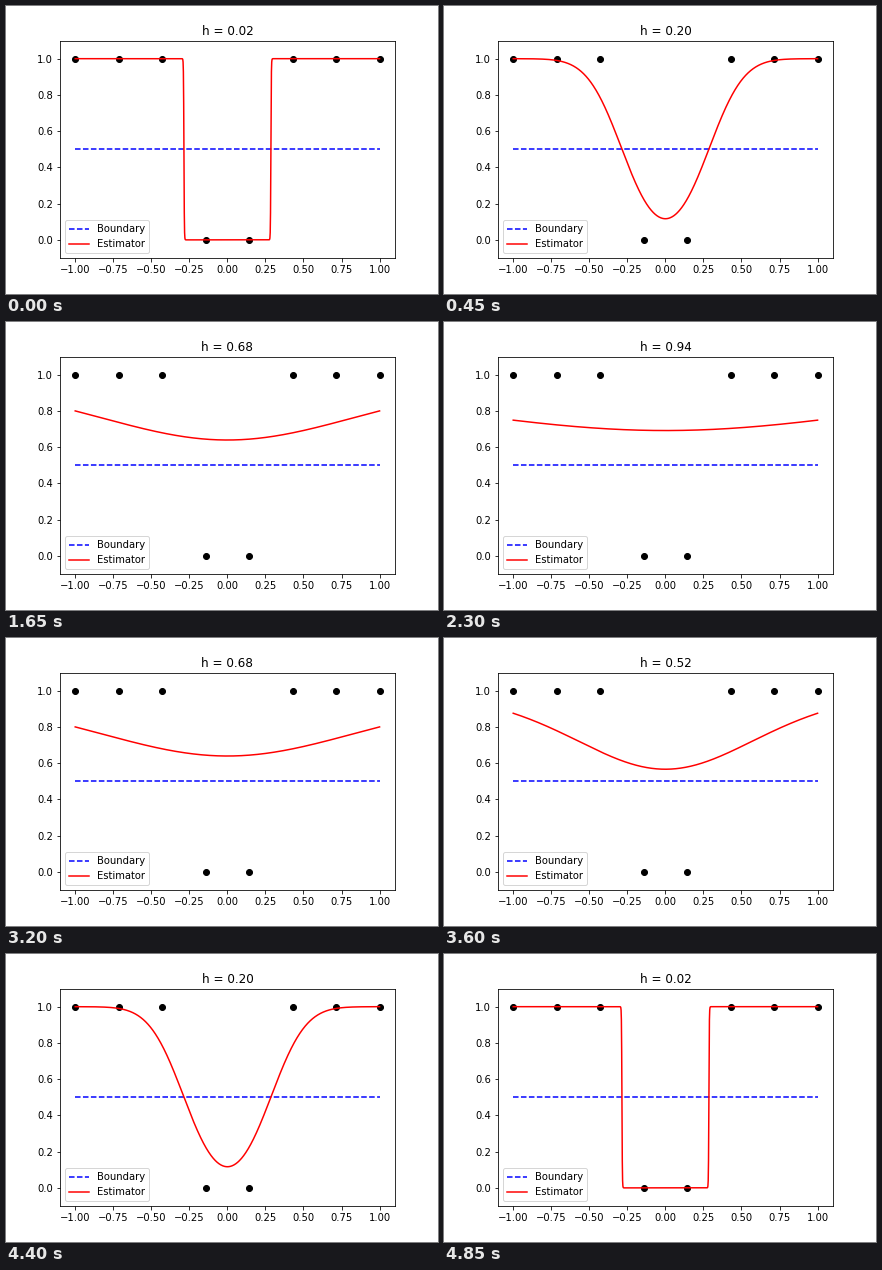
Recreate the animation shown at these times as a matplotlib script. Size 432x288 px, loop 4900 ms.

```python
import numpy as np
import matplotlib.pyplot as plt
from matplotlib.animation import FuncAnimation

plt.rcParams["font.family"] = "DejaVu Sans"
plt.rcParams["font.size"] = 10

STEP = 0.02
RISE = 49
FRAMES = 2 * RISE
INTERVAL = 50

samples = np.linspace(-1, 1, 8)
labels = (np.abs(samples) > 0.25).astype(float)
grid = np.linspace(-1, 1, 1000)


def bandwidth(frame):
    """Rise to the widest kernel, hold one extra frame, fall back."""
    return STEP * min(frame + 1, FRAMES - frame)


def estimate(h):
    """Kernel regression with Gaussian weights."""
    weights = np.exp(-((grid[:, None] - samples) / h) ** 2 / 2)
    return weights @ labels / weights.sum(axis=1)


fig, ax = plt.subplots(figsize=(6, 4), dpi=72, facecolor="white")
fig.subplots_adjust(left=0.125, right=0.9, bottom=0.125, top=0.88)

ax.scatter(samples, labels, color="k")
ax.plot(grid, np.full_like(grid, 0.5), "b--", label="Boundary")
curve, = ax.plot(grid, estimate(STEP), "r", label="Estimator")
ax.set_xlim(-1.1, 1.1)
ax.set_ylim(-0.1, 1.1)
ax.legend(loc="lower left")
title = ax.set_title("")


def update(frame):
    h = bandwidth(frame)
    curve.set_ydata(estimate(h))
    title.set_text(f"h = {h:.2f}")
    return curve, title


anim = FuncAnimation(fig, update, frames=FRAMES, interval=INTERVAL,
                     repeat=True, repeat_delay=0, blit=False)
plt.show()
```
